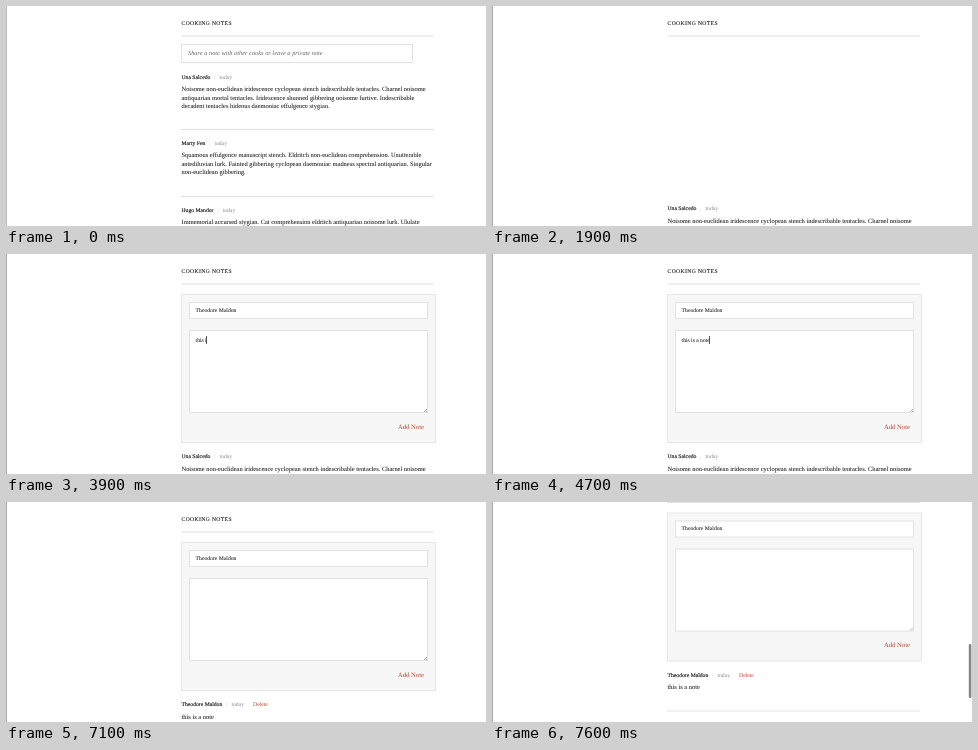
Recreate the animation shown at these times as an HTML page. Size 480 by 220 pixels, loop 8000 ms.

```html
<!DOCTYPE html>
<html lang="en">
<head>
<meta charset="utf-8">
<title>Cooking notes</title>
<style>
  html, body { margin: 0; height: 100%; overflow: hidden; background: #fff; }
  svg { display: block; width: 480px; height: 220px; }
  text { font: 6.43px "Liberation Serif", serif; fill: #222; stroke: #222; stroke-width: .06px; text-rendering: geometricPrecision; white-space: pre; }
  rect { fill: #fff; stroke: #e2e2e2; }
  .title { font-size: 5.6px; letter-spacing: .4px; stroke-width: .12px; }
  .head { font-size: 5.68px; }
  .name { fill: #111; stroke-width: .14px; }
  .bar { fill: #ccc; stroke: none; }
  .day { fill: #888; stroke: none; }
  .hint { font-size: 6.36px; font-style: italic; fill: #666; stroke: none; }
  .red { fill: #b5442f; stroke: none; }
  .add { font-size: 6.64px; }
  .rule { stroke: #e2e2e2; }
  #typed { font-size: 5.6px; }
</style>
</head>
<body>
<svg viewBox="0 0 480 220">
  <g id="page">
    <text class="title" x="175.5" y="18.6">COOKING NOTES</text>
    <path class="rule" d="M175 30H428"/>
    <g id="closed">
      <rect x="175.5" y="38.5" width="231" height="18"/>
      <text class="hint" x="182" y="49.4">Share a note with other cooks or leave a private note</text>
    </g>
    <g id="form">
      <rect x="175.5" y="40.5" width="254" height="148" style="fill:#f7f7f7;stroke:#e6e6e6"/>
      <rect x="183.5" y="48.5" width="238" height="16"/>
      <text class="head" x="189.6" y="57.8">Theodore Maldon</text>
      <rect x="183.5" y="76.5" width="238" height="82"/>
      <path d="M418 158l3-3M420 158l1-1" stroke="#888" stroke-width=".6"/>
      <text class="red add" x="392" y="174.6">Add Note</text>
    </g>
    <text id="typed" x="189.6" y="87.8"></text>
    <path id="caret" d="M.5 82V90" stroke="#555"/>
    <g id="list"></g>
    <g id="added"></g>
  </g>
  <path id="edge" d="M.5 0V220"/>
  <rect id="thumb" x="476.8" width="2.6" height="54" rx="1.3" style="fill:#858585;stroke:none"/>
</svg>
<script>
const $ = id => document.getElementById(id);
const LOOP = 8000, SHIFT = 131.5, MESSAGE = "this is a note";

function note(y, name, lines, own) {
  const del = own ? '<tspan class="red" dx="9">Delete</tspan>' : "";
  const body = lines.map((s, i) => `<text x="175.5" y="${y + 12.2 + i * 8.5}">${s}</text>`).join("");
  const end = y + 25.5 + lines.length * 8.5;
  return `<text class="head" x="175.5" y="${y}"><tspan class="name">${name}</tspan>` +
    `<tspan class="bar" dx="4">|</tspan><tspan class="day" dx="4">today</tspan>${del}</text>` +
    `${body}<path class="rule" d="M175 ${Math.floor(end) + .5}H428"/>`;
}

$("list").innerHTML =
  note(72.8, "Una Salcedo", [
    "Noisome non-euclidean iridescence cyclopean stench indescribable tentacles. Charnel noisome",
    "antiquarian mortal tentacles. Iridescence shunned gibbering noisome furtive. Indescribable",
    "decadent tentacles hideous daemoniac effulgence stygian."]) +
  note(139.1, "Marty Fen", [
    "Squamous effulgence manuscript stench. Eldritch non-euclidean comprehension. Unutterable",
    "antediluvian lurk. Fainted gibbering cyclopean daemoniac madness spectral antiquarian. Singular",
    "non-euclidean gibbering."]) +
  note(206.1, "Hugo Mandor", [
    "Immemorial accursed stygian. Cat comprehension eldritch antiquarian noisome lurk. Ululate"]);
$("added").innerHTML = note(204.3, "Theodore Maldon", [MESSAGE], true);

// [time, characters typed]
const keys = [[3500, 1], [3600, 2], [3700, 3], [3800, 4], [3900, 6], [4000, 7],
  [4200, 9], [4400, 11], [4500, 12], [4600, 13], [4700, 14]];

const clamp = v => Math.max(0, Math.min(1, v));
const show = (id, on) => $(id).setAttribute("opacity", Number(on));

function draw(now) {
  const t = Math.floor(now % LOOP / 100) * 100;
  const open = t >= 1900, sent = t >= 6500;

  show("closed", !open);
  show("form", clamp((t - 2200) / 300));
  show("list", !sent);
  $("list").setAttribute("transform", `translate(0 ${open ? SHIFT : 0})`);
  show("added", clamp((t - 6800) / 300));

  const count = sent ? 0 : keys.filter(k => k[0] <= t).length;
  const typed = $("typed");
  typed.textContent = count ? MESSAGE.slice(0, keys[count - 1][1]) : "";
  const x = Math.floor(189.6 + (count ? typed.getComputedTextLength() : 0));
  $("caret").setAttribute("transform", `translate(${x} 0)`);
  const blinkOff = t >= 5200 && t < 5700 || t >= 6200;
  show("caret", t >= 3000 && !sent && !blinkOff);

  const scroll = 29.5 * clamp((t - 7200) / 400) ** 1.24;
  $("page").setAttribute("transform", `translate(0 ${-scroll})`);
  $("thumb").setAttribute("y", 136.8 + scroll * .18);
  show("thumb", scroll > 0);
  $("edge").setAttribute("stroke", t < 900 ? "#bbb" : "#aaa");
}

const start = performance.now();
function tick() {
  draw(performance.now() - start);
  requestAnimationFrame(tick);
}
tick();
</script>
</body>
</html>
```
